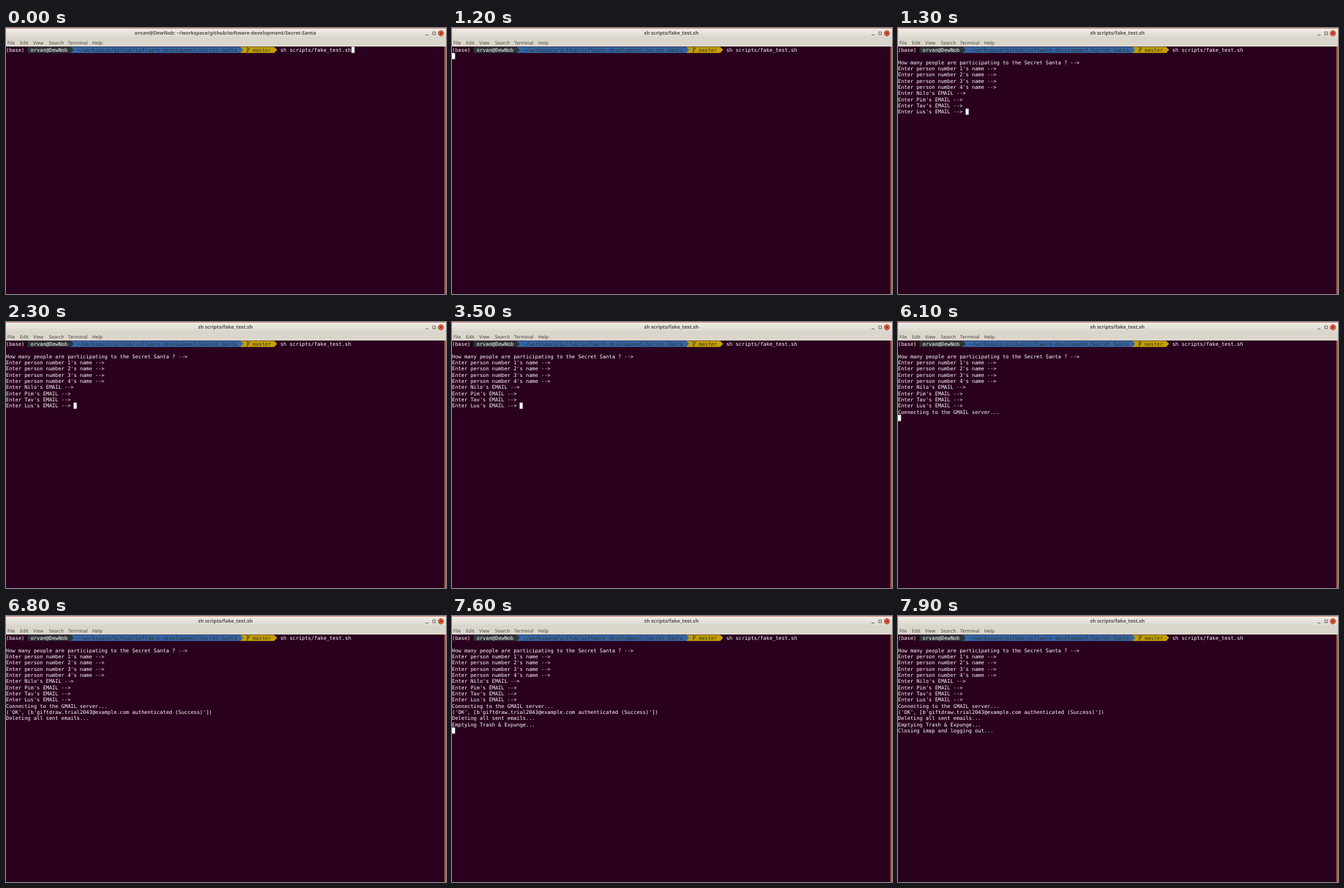
Animation of 666x402 px, one loop 8000 ms. Source, as an HTML page:

```html
<!DOCTYPE html>
<html lang="en">
<head>
<meta charset="utf-8">
<title>Terminal session</title>
<style>
  html, body { margin: 0; width: 100%; height: 100%; overflow: hidden; background: #29001e; }
  svg { display: block; width: 666px; height: 402px; }
  text { white-space: pre; text-rendering: geometricPrecision; }
  .term { font: 7.749px "DejaVu Sans Mono", monospace; fill: #fff; }
  .dark { fill: #2e3436; }
  .menu { font: 7.2px "Noto Sans", "Open Sans", sans-serif; fill: #4a4a46; }
  .title { font: bold 7.4px "Noto Sans", "Open Sans", sans-serif; fill: #55534d; text-anchor: middle; }

  /* 1% of the loop is 80 ms */
  .idle, .busy, .ask, .connect, .auth, .empty, .close, .cursor {
    animation: 8s step-end infinite;
  }
  .idle { animation-name: idle; }
  .busy { animation-name: busy; }
  .ask { animation-name: ask; }
  .connect { animation-name: connect; }
  .auth { animation-name: auth; }
  .empty { animation-name: empty; }
  .close { animation-name: close; }
  .cursor { animation-name: cursor; }

  @keyframes idle { 0% { opacity: 1 } 15%, 100% { opacity: 0 } }
  @keyframes busy { 0% { opacity: 0 } 15%, 100% { opacity: 1 } }
  @keyframes ask { 0% { opacity: 0 } 16.25%, 100% { opacity: 1 } }
  @keyframes connect { 0% { opacity: 0 } 66.25%, 100% { opacity: 1 } }
  @keyframes auth { 0% { opacity: 0 } 80%, 100% { opacity: 1 } }
  @keyframes empty { 0% { opacity: 0 } 93.75%, 100% { opacity: 1 } }
  @keyframes close { 0% { opacity: 0 } 97.5%, 100% { opacity: 1 } }

  @keyframes cursor {
    0%     { transform: translate(523px, 28.4px); opacity: 1 }
    6.25%  { transform: translate(523px, 28.4px); opacity: 0 }
    13.75% { transform: translate(523px, 28.4px); opacity: 1 }
    15%    { transform: translate(0, 37.8px); opacity: 1 }
    16.25% { transform: translate(102.4px, 121.8px); opacity: 1 }
    21.25% { transform: translate(102.4px, 121.8px); opacity: 0 }
    28.75% { transform: translate(102.4px, 121.8px); opacity: 1 }
    36.25% { transform: translate(102.4px, 121.8px); opacity: 0 }
    43.75% { transform: translate(102.4px, 121.8px); opacity: 1 }
    51.25% { transform: translate(102.4px, 121.8px); opacity: 0 }
    60%    { transform: translate(102.4px, 121.8px); opacity: 1 }
    66.25% { transform: translate(0, 140.4px); opacity: 0 }
    73.75% { transform: translate(0, 140.4px); opacity: 1 }
    80%    { transform: translate(0, 159.1px); opacity: 1 }
    82.5%  { transform: translate(0, 159.1px); opacity: 0 }
    90%    { transform: translate(0, 159.1px); opacity: 1 }
    93.75% { transform: translate(0, 168.4px); opacity: 1 }
    97.5%, 100% { transform: translate(0, 177.7px); opacity: 0 }
  }
</style>
</head>
<body>
<svg viewBox="0 0 666 402">
  <defs>
    <linearGradient id="header" x2="0" y2="1">
      <stop offset="0" stop-color="#f3f0ea"/>
      <stop offset="1" stop-color="#d9d4ca"/>
    </linearGradient>
  </defs>

  <!-- window frame -->
  <rect width="666" height="402" fill="#29001e"/>
  <rect x="663" y="28" width="1" height="374" fill="#6e2a2c"/>
  <rect x="664" y="28" width="2" height="374" fill="#c9573f"/>
  <rect width="666" height="16" fill="url(#header)"/>
  <rect y="15.5" width="666" height="12.5" fill="#dbd6cc"/>
  <rect width="666" height="1" fill="#d98278"/>

  <text class="title idle" x="332" y="10.3">orvan@DewNob: ~/workspace/github/software-development/Secret-Santa</text>
  <text class="title busy" x="332" y="10.3">sh scripts/fake_test.sh</text>

  <g fill="none" stroke="#66635c">
    <path d="M635 10.5h4.5"/>
    <rect x="646" y="6" width="4" height="4"/>
  </g>
  <circle cx="658.3" cy="8" r="4.2" fill="#e0583f" stroke="#a8452f" stroke-width=".6"/>
  <path d="M656.7 6.4l3.2 3.2m0-3.2l-3.2 3.2" stroke="#5d2418" stroke-width="1"/>

  <g class="menu">
    <text x="2" y="24.7">File</text>
    <text x="21" y="24.7">Edit</text>
    <text x="41" y="24.7">View</text>
    <text x="65" y="24.7">Search</text>
    <text x="94" y="24.7">Terminal</text>
    <text x="130.5" y="24.7">Help</text>
  </g>

  <!-- prompt -->
  <path d="M359 28.4h46.8l4.7 4.7l-4.7 4.7h-51.3v-9.4z" fill="#c4a000"/>
  <path d="M98 28.4h256.5l4.7 4.7l-4.7 4.7h-256.5z" fill="#3465a4"/>
  <path d="M32.6 28.4h65.4l4.6 4.7l-4.6 4.7h-65.4z" fill="#2e3436"/>
  <path d="M365.2 28.8v8.6m0-2.2q2.6-.6 2.6-3.6v-1.4m-1.3 1.2l1.3-1.4l1.3 1.4" fill="none" stroke="#2e3436" stroke-width=".9"/>
  <g class="term">
    <text x="0" y="36">(base)</text>
    <text x="37.3" y="36">orvan@DewNob</text>
    <text x="107.3" y="36" class="dark">~/workspace/github/software-development/Secret-Santa</text>
    <text x="373.2" y="36" class="dark">master</text>
    <text x="415.2" y="36">sh scripts/fake_test.sh</text>

    <!-- output -->
    <text class="ask" y="54.7"><tspan x="0">How many people are participating to the Secret Santa ? --&gt;</tspan><tspan x="0" dy="9.33">Enter person number 1's name --&gt;</tspan><tspan x="0" dy="9.33">Enter person number 2's name --&gt;</tspan><tspan x="0" dy="9.33">Enter person number 3's name --&gt;</tspan><tspan x="0" dy="9.33">Enter person number 4's name --&gt;</tspan><tspan x="0" dy="9.33">Enter Nilo's EMAIL --&gt;</tspan><tspan x="0" dy="9.33">Enter Pim's EMAIL --&gt;</tspan><tspan x="0" dy="9.33">Enter Tav's EMAIL --&gt;</tspan><tspan x="0" dy="9.33">Enter Lus's EMAIL --&gt;</tspan></text>
    <text class="connect" x="0" y="138.7">Connecting to the GMAIL server...</text>
    <text class="auth" y="148"><tspan x="0">('OK', [b'giftdraw.trial2043@example.com authenticated (Success)'])</tspan><tspan x="0" dy="9.33">Deleting all sent emails...</tspan></text>
    <text class="empty" x="0" y="166.6">Emptying Trash &amp; Expunge...</text>
    <text class="close" x="0" y="176">Closing imap and logging out...</text>
  </g>
  <rect class="cursor" width="4.6" height="9.3" fill="#fff"/>
</svg>
</body>
</html>
```
